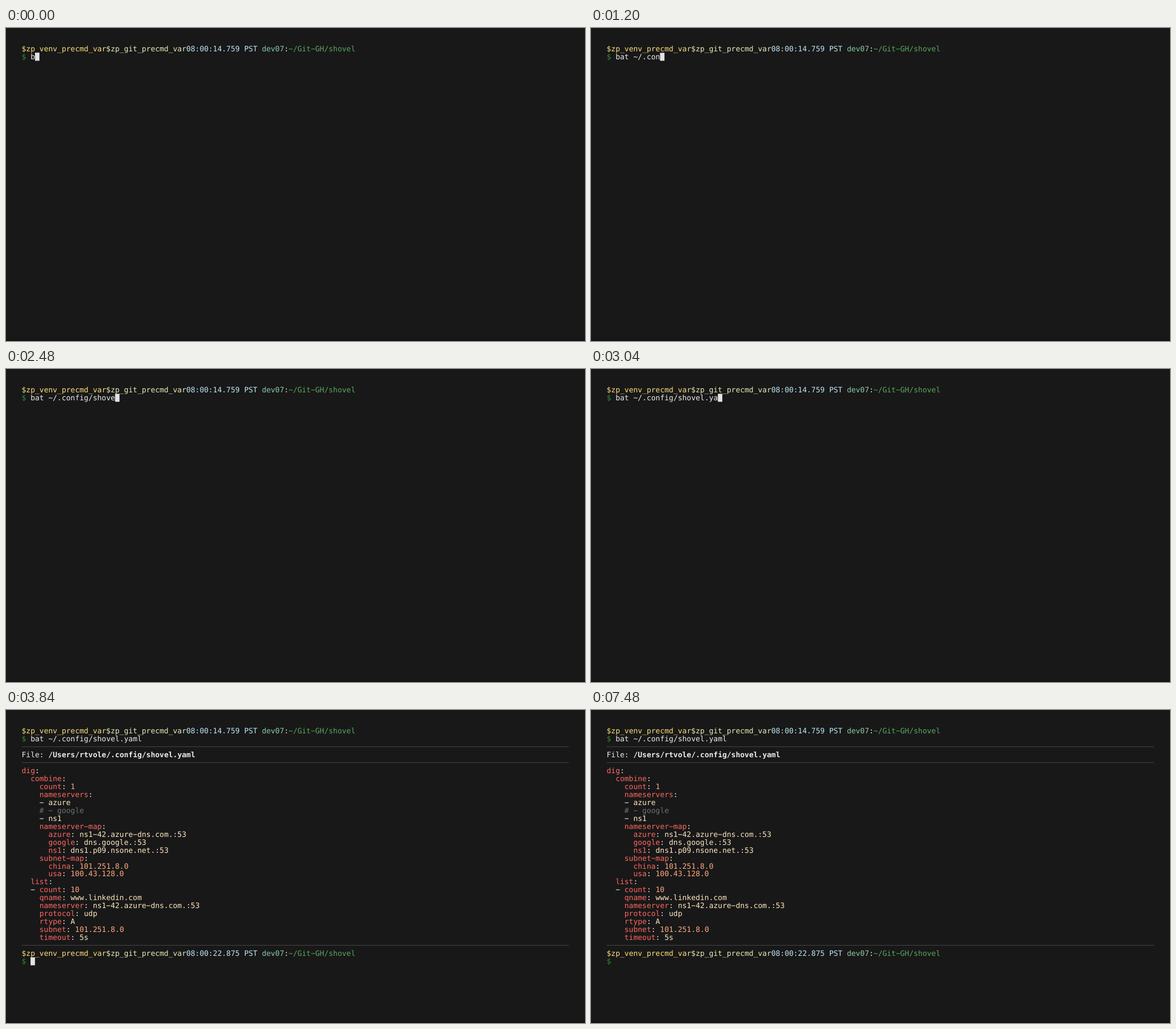
Animation, 1018 px wide and 550 px high, one loop 8 s. Source, as an HTML page:

```html
<!DOCTYPE html>
<html lang="en">
<head>
<meta charset="utf-8">
<title>Terminal</title>
<style>
  html, body { margin: 0; width: 100%; height: 100%; overflow: hidden; background: #181818; }
  svg { display: block; }
  text {
    font: 13px "DejaVu Sans Mono", monospace;
    white-space: pre;
    text-rendering: geometricPrecision;
  }
</style>
</head>
<body>
<svg id="stage" width="1018" height="550" viewBox="0 0 1018 550">
  <rect width="1018" height="550" fill="#181818"/>
  <rect y="548" width="1018" height="2" fill="#140d12"/>
</svg>
<script>
const LOOP = 8000, LEFT = 27.5, TOP = 29.6, CELL = 7.822, ROW = 13.965;
const ENTER = 3800, OUTPUT = 3840;
const COMMAND = 'bat ~/.config/shovel.yaml';
const KEYS = [120, 280, 440, 560, 680, 840, 960, 1080, 1200, 1360, 1480, 1680,
  1800, 1920, 2040, 2200, 2320, 2480, 2600, 2760, 2920, 3040, 3200, 3320];
const BLINKS = [4560, 5320, 6040, 6720, 7480];
const C = {
  white: '#ececec', yellow: '#fde07c', pale: '#ebecb9', time: '#bfe6f5',
  host: '#8bcba6', path: '#5aa75e', prompt: '#2f8a35', key: '#ff6762',
  number: '#ffa983', string: '#ffe8c2', comment: '#707070', rule: '#444444'
};
const YAML = `dig:
  combine:
    count: 1
    nameservers:
    - azure
    # - google
    - ns1
    nameserver-map:
      azure: ns1-42.azure-dns.com.:53
      google: dns.google.:53
      ns1: dns1.p09.nsone.net.:53
    subnet-map:
      china: 101.251.8.0
      usa: 100.43.128.0
  list:
  - count: 10
    qname: www.linkedin.com
    nameserver: ns1-42.azure-dns.com.:53
    protocol: udp
    rtype: A
    subnet: 101.251.8.0
    timeout: 5s`.split('\n');

const stage = document.getElementById('stage');
const colX = col => LEFT + col * CELL;
const rowY = row => TOP + row * ROW;

function add(parent, tag, attrs) {
  const el = document.createElementNS('http://www.w3.org/2000/svg', tag);
  for (const name in attrs) el.setAttribute(name, attrs[name]);
  return parent.appendChild(el);
}

// The wide minus glyph stands for the long terminal hyphen.
const glyphs = s => s.replace(/-/g, '\u2212');

function write(parent, row, col, s, fill, weight = 400) {
  const el = add(parent, 'text', { x: colX(col), y: rowY(row) + 11.5, fill });
  el.style.fontWeight = weight;
  el.textContent = glyphs(s);
  return el;
}

function writeRuns(parent, row, runs) {
  let col = 0;
  for (const [s, fill, weight] of runs) {
    const body = s.trimStart();
    if (body) write(parent, row, col + s.length - body.length, body, fill, weight);
    col += s.length;
  }
}

function prompt(parent, row, clock) {
  writeRuns(parent, row, [
    ['$zp_venv_precmd_var', C.yellow], ['$zp_git_precmd_var', C.pale],
    [clock + ' PST ', C.time], ['dev07', C.host], [':', C.white],
    ['~/Git-GH/shovel', C.path]
  ]);
  write(parent, row + 1, 0, '$', C.prompt);
}

function rule(parent, row) {
  add(parent, 'rect', {
    x: LEFT, y: Math.floor(rowY(row) + 7), width: 123 * CELL, height: 1, fill: C.rule
  });
}

function yamlRuns(line) {
  if (/^\s*#/.test(line)) return [[line, C.comment]];
  const pair = line.match(/^(\s*(?:- )?)([\w-]+)(:)(.*)$/);
  if (pair) {
    const [, lead, key, colon, value] = pair;
    const fill = /^[\d. ]+$/.test(value) ? C.number : C.string;
    return [[lead, C.white], [key, C.key], [colon, C.white], [value, fill]];
  }
  const [, dash, item] = line.match(/^(\s*- )(.*)$/);
  return [[dash, C.white], [item, C.string]];
}

prompt(stage, 0, '08:00:14.759');
const typed = write(stage, 1, 2, '', C.white);

const output = add(stage, 'g', {});
rule(output, 2);
writeRuns(output, 3, [['File: ', C.white], ['/Users/rtvole/.config/shovel.yaml', C.white, 700]]);
rule(output, 4);
YAML.forEach((line, i) => writeRuns(output, 5 + i, yamlRuns(line)));
rule(output, 27);
prompt(output, 28, '08:00:22.875');

const cursor = add(stage, 'rect', { width: CELL, height: 14, fill: '#e2e2e2' });

const passed = (times, t) => times.filter(at => t >= at).length;

function draw(t) {
  const count = 1 + passed(KEYS, t);
  typed.textContent = glyphs(COMMAND.slice(0, count));
  const done = t >= OUTPUT;
  output.style.display = done ? '' : 'none';

  let row = 1, col = 2 + count;
  if (done) { row = 29; col = 2; }
  else if (t >= ENTER) { row = 2; col = 0; }
  cursor.setAttribute('x', colX(col));
  cursor.setAttribute('y', rowY(row));
  cursor.style.display = passed(BLINKS, t) % 2 ? 'none' : '';
}

const start = performance.now();
function tick(now) {
  draw(Math.max(0, now - start) % LOOP);
  requestAnimationFrame(tick);
}
draw(0);
requestAnimationFrame(tick);
</script>
</body>
</html>
```
